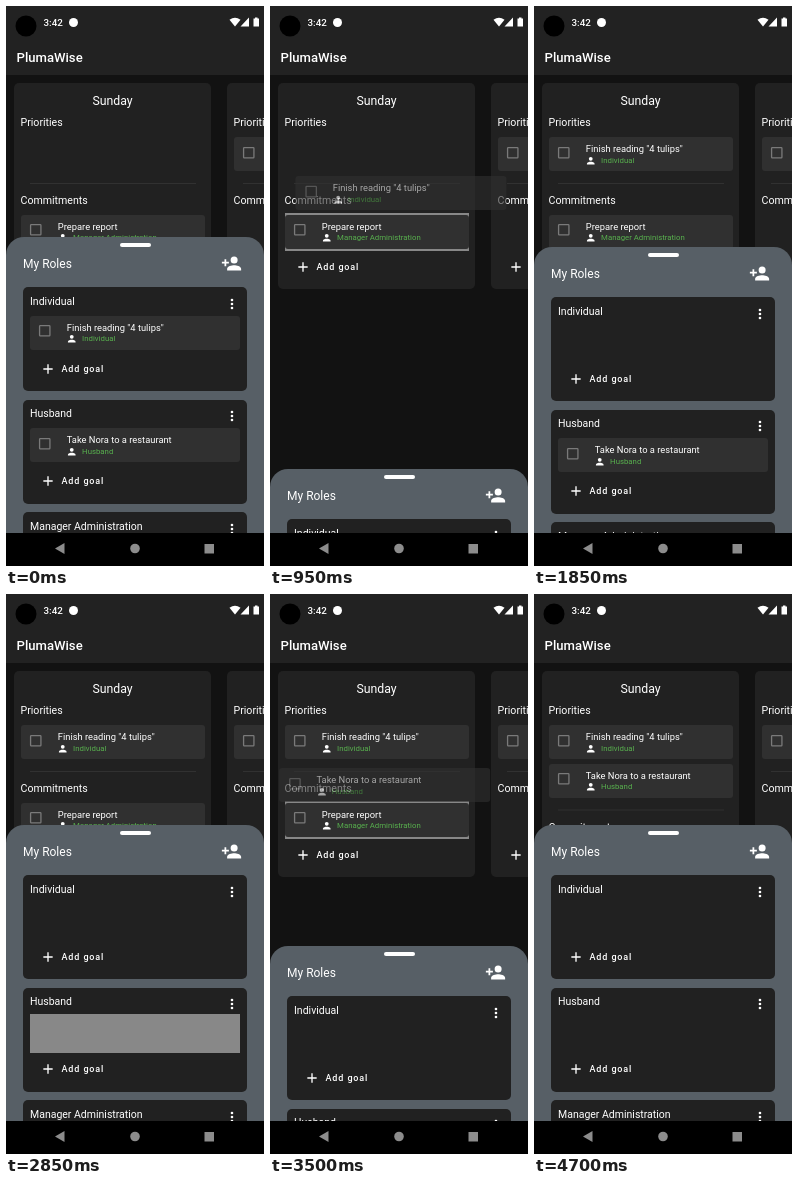
Write an HTML page that moves like this. It is 258 by 560 pixels and loops after 5250 ms.

```html
<!DOCTYPE html>
<html lang="en">
<head>
<meta charset="utf-8">
<title>Weekly planner</title>
<style>
  html, body { margin: 0; width: 100%; height: 100%; overflow: hidden; background: #121212; }
  #stage { position: relative; width: 258px; height: 560px; overflow: hidden; background: #121212;
    color: #fff; font-family: Roboto, sans-serif; }
  #stage div, #stage span, #stage svg { position: absolute; }
  span { line-height: 16px; white-space: pre; }
  svg { overflow: visible; }
  .bar { left: 0; top: 0; width: 258px; height: 69px; background: #222; }
  .card { background: #212121; border-radius: 5px; }
  .item { height: 34px; background: #303030; border-radius: 3px; }
  .rule { height: 1px; background: #313131; }
  .lit { background: #888; }
  .sheet { left: 0; top: 0; width: 258px; height: 400px; background: #575f66; border-radius: 18px 18px 0 0; }
  .grip { left: 113.5px; top: 6px; width: 31px; height: 4px; border-radius: 2px; background: #fff; }
  .nav { left: 0; top: 527px; width: 258px; height: 33px; background: #000; }
  .ghost { opacity: .6; left: 0; top: 0; }
</style>
</head>
<body>
<div id="stage"></div>
<script>
const stage = document.getElementById('stage');
const PERSON = 'M12 12a4 4 0 1 0 0-8 4 4 0 0 0 0 8zm0 2c-2.7 0-8 1.3-8 4v2h16v-2c0-2.7-5.3-4-8-4z';
const ADD_PERSON = 'M15 12a4 4 0 1 0 0-8 4 4 0 0 0 0 8zM6 10V7H4v3H1v2h3v3h2v-3h3v-2zm9 4c-2.7 0-8 1.3-8 4v2h16v-2c0-2.7-5.3-4-8-4z';
const PLUS = 'M19 13h-6v6h-2v-6H5v-2h6V5h2v6h6z';
const DOTS = 'M12 8a2 2 0 1 0 0-4 2 2 0 0 0 0 4zm0 2a2 2 0 1 0 0 4 2 2 0 0 0 0-4zm0 6a2 2 0 1 0 0 4 2 2 0 0 0 0-4z';
const CHECK = 'M19 5v14H5V5zm0-2H5a2 2 0 0 0-2 2v14a2 2 0 0 0 2 2h14a2 2 0 0 0 2-2V5a2 2 0 0 0-2-2z';

function box(parent, cls, x, y, w, h) {
  const el = document.createElement('div');
  el.className = cls;
  const set = { left: x, top: y, width: w, height: h };
  for (const k in set) if (set[k] !== undefined) el.style[k] = set[k] + 'px';
  return parent.appendChild(el);
}

function text(parent, str, x, cy, size, style = '') {
  const el = document.createElement('span');
  el.textContent = str;
  el.style.cssText = `left:${x}px;top:${cy - 8}px;font-size:${size}px;${style}`;
  return parent.appendChild(el);
}

// 24-unit icon centred on a point
function icon(parent, path, cx, cy, size, fill = '#fff') {
  parent.insertAdjacentHTML('beforeend',
    `<svg viewBox="0 0 24 24" width="${size}" height="${size}" style="left:${cx - size / 2}px;top:${cy - size / 2}px"><path d="${path}" fill="${fill}"/></svg>`);
}

function goal(parent, x, y, w, title, role) {
  const el = box(parent, 'item', x, y, w);
  icon(el, CHECK, 15.7, 15.5, 15.5, '#7a7a7a');
  text(el, title, 37.3, 12, 9.35);
  icon(el, PERSON, 42.3, 23.5, 11.5);
  text(el, role, 52.6, 23.5, 7.8, 'color:#58b04e');
  return el;
}

function addGoal(parent, x, cy) {
  icon(parent, PLUS, x, cy, 16);
  text(parent, 'Add goal', x + 13.5, cy, 9, 'font-weight:500;letter-spacing:.87px');
}

const READ = ['Finish reading "4 tulips"', 'Individual'];
const DINE = ['Take Nora to a restaurant', 'Husband'];
const WORK = ['Prepare report', 'Manager Administration'];

function day(x, name) {
  const card = box(stage, 'card', x, 77, 197, 206);
  text(card, name, 0, 18, 12.3, 'width:197px;text-align:center');
  text(card, 'Priorities', 6.5, 40, 10.6);
  const lower = box(card, '', 0, 0);
  box(lower, 'rule', 16, 100, 166);
  text(lower, 'Commitments', 6.5, 117.5, 10.6);
  addGoal(lower, 25, 184);
  return { card, lower };
}

const today = day(8, 'Sunday');
const next = day(221, 'Monday');
goal(next.card, 6.5, 54, 184, '', '');

const litPri = box(today.card, 'lit', 6.5, 54, 184, 34);
const litCom = box(today.lower, 'lit', 6.5, 129.5, 184, 38);
const pri1 = goal(today.card, 6.5, 54, 184, ...READ);
const pri2 = goal(today.card, 6.5, 92.5, 184, ...DINE);
goal(today.lower, 6.5, 131.5, 184, ...WORK);

const bar = box(stage, 'bar');
bar.innerHTML = `<svg width="258" height="69" fill="#fff">
  <circle cx="20" cy="20" r="10.5" fill="#000"/>
  <circle cx="67.5" cy="16.5" r="4.5"/>
  <path d="M223.5 13.8Q229 9.6 234.5 13.8L229 20.5Z"/>
  <path d="M243 11.5V20.5H234.5Z"/>
  <path d="M247.5 12.5h1.5v-1h2.5v1h1.5v8h-5.5z"/></svg>`;
text(bar, '3:42', 37.5, 16.5, 9.8, 'font-weight:500');
text(bar, 'PlumaWise', 10.5, 51.5, 13.1, 'font-weight:500');

const sheet = box(stage, 'sheet');
box(sheet, 'grip');
text(sheet, 'My Roles', 17, 26.5, 12);
icon(sheet, ADD_PERSON, 225.5, 26, 21);

function role(y, name, task) {
  const card = box(sheet, 'card', 17, y, 224, 104);
  text(card, name, 7, 14.5, 10.5);
  icon(card, DOTS, 209, 16.5, 16);
  const lit = box(card, 'lit', 6.5, 26, 210.5, 39);
  const item = task && goal(card, 6.5, 28.5, 210.5, ...task);
  addGoal(card, 25, 81.5);
  return { lit, item };
}
const self = role(50, 'Individual', READ);
const spouse = role(162.7, 'Husband', DINE);
role(275.4, 'Manager Administration');

const nav = box(stage, 'nav');
nav.innerHTML = `<svg width="258" height="33" fill="#8c8c8c">
  <path d="M49 15.5L58.5 10V21Z"/><circle cx="129" cy="15.5" r="4.8"/>
  <rect x="198.5" y="11" width="9.5" height="9.5"/></svg>`;

const makeGhost = task => {
  const el = goal(stage, 0, 0, 210.5, ...task);
  el.classList.add('ghost');
  return el;
};

// Each drag: [ms, x, y] points, last one is the drop
const drags = [
  { el: makeGhost(READ), path: [[100, 24, 310], [200, 27, 306], [550, 38, 233], [700, 34.5, 203], [1100, 20, 150], [1500, 20, 150]] },
  { el: makeGhost(DINE), path: [[2900, 23, 421], [3350, 16, 230], [3500, 9.2, 174], [3800, 5.3, 126], [4250, 5.3, 126]] }
];

// Sheet settles: [start ms, from, to]
const OPEN = 231, SHUT = 480, SETTLE = 512;
const settles = [[736, OPEN, SHUT], [1605, SHUT, OPEN], [3436, OPEN, SHUT], [4305, SHUT, OPEN]];

// Lists lit as drop targets: [element, from, to]
const lights = [
  [self.lit, 50, 200], [litCom, 650, 1150], [litPri, 1150, 1550],
  [spouse.lit, 2850, 2950], [self.lit, 3150, 3250], [litCom, 3400, 3800], [litPri, 4000, 4300]
];

const LOOP = 5250, STEP = 50;
const show = (el, on) => { el.style.visibility = on ? 'visible' : 'hidden'; };
const move = (el, x, y) => { el.style.transform = `translate(${x}px,${y}px)`; };

function along(path, t) {
  const i = path.findIndex(p => p[0] > t);
  const a = path[i - 1], b = path[i];
  const k = (t - a[0]) / (b[0] - a[0]);
  return [a[1] + (b[1] - a[1]) * k, a[2] + (b[2] - a[2]) * k];
}

function sheetTop(t) {
  let y = OPEN;
  for (const [start, from, to] of settles) {
    if (t < start) break;
    const k = Math.min(1, (t - start) / SETTLE);
    y = from + (to - from) * (1 - (1 - k) ** 5);
  }
  return Math.round(y);
}

function render(t) {
  move(sheet, 0, sheetTop(t));
  for (const { el, path } of drags) {
    const on = t >= path[0][0] && t < path[path.length - 1][0];
    show(el, on);
    if (on) move(el, ...along(path, t));
  }
  for (const [el] of lights) show(el, lights.some(l => l[0] === el && t >= l[1] && t < l[2]));
  show(self.item, t < 50);
  show(spouse.item, t < 2850);
  show(pri1, t >= 1550);
  show(pri2, t >= 4300);

  const filled = t >= 1550, grown = t >= 4300;
  litPri.style.top = (filled ? 52 : 54) + 'px';
  litPri.style.height = (filled ? 38 : 34) + 'px';
  move(today.lower, 0, grown ? 38.5 : 0);
  today.card.style.height = (grown ? 244.5 : 206) + 'px';
}

const origin = performance.now();
function tick() {
  const t = (performance.now() - origin) % LOOP;
  render(Math.floor(t / STEP) * STEP);
  requestAnimationFrame(tick);
}
render(0);
requestAnimationFrame(tick);
</script>
</body>
</html>
```
